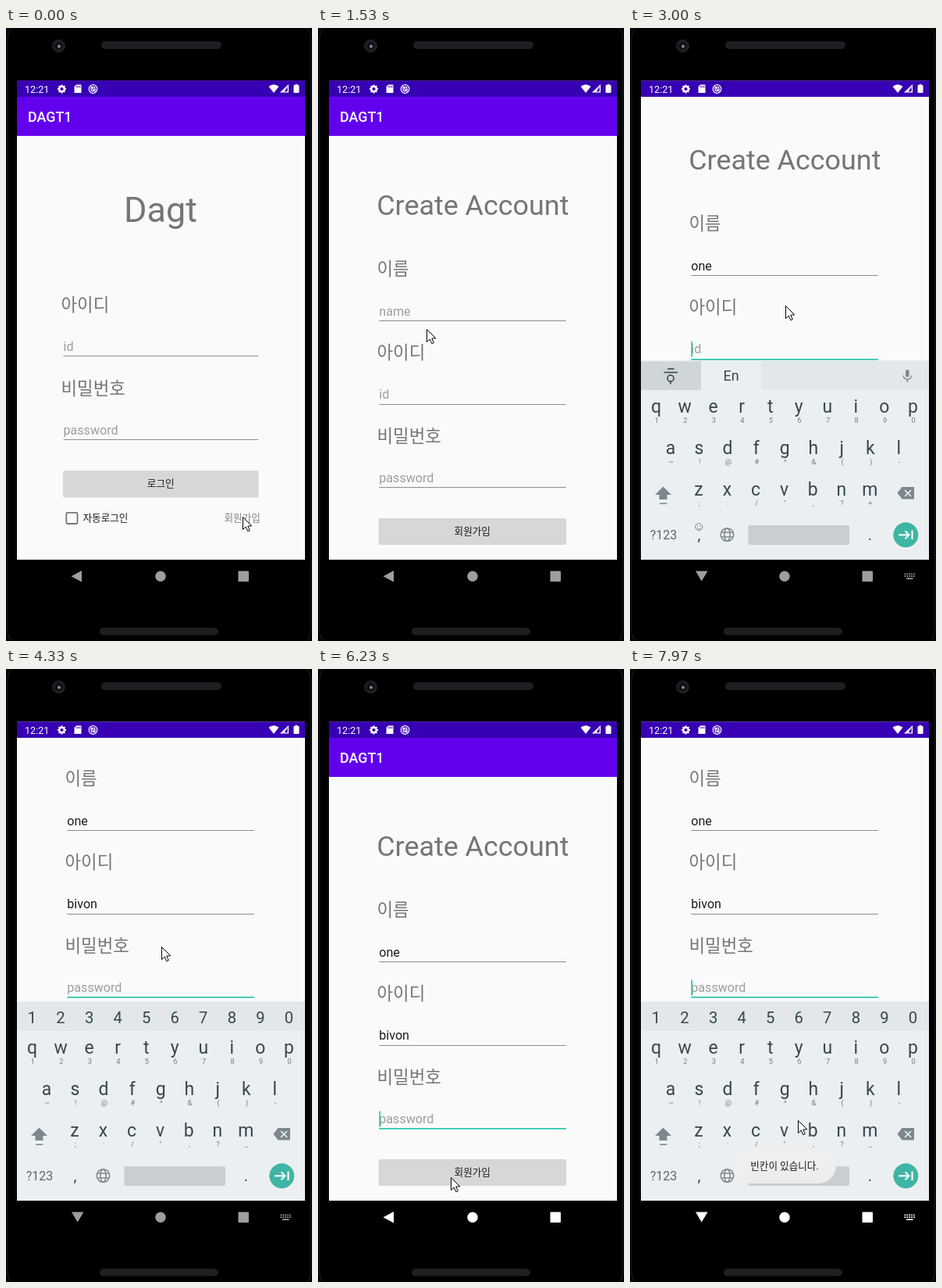
An HTML page with a canvas for the animation above (8 s loop, 392x784 px).

```html
<!DOCTYPE html>
<html lang="ko">
<head>
<meta charset="utf-8">
<title>Sign-up demo</title>
<style>
html, body { margin: 0; width: 100%; height: 100%; overflow: hidden; background: #000; }
canvas { display: block; width: 392px; height: 784px; }
</style>
</head>
<body>
<canvas id="stage"></canvas>
<script>
const W = 392, H = 784, LOOP = 8000;
const FONT = "Roboto, 'Noto Sans CJK KR', 'Noto Sans CJK', sans-serif";
const C = {
  paper: '#fafafa', bar: '#6200ee', status: '#3700b3', white: '#ffffff',
  grey: '#757575', hint: '#9d9d9d', ink: '#1c1c1c', line: '#8c8c8c',
  teal: '#2fc4b0', button: '#d6d7d7', keys: '#eceff1', strip: '#e3e7e9', tab: '#d0d5d8',
  key: '#37474f', sub: '#717d83', icon: '#7c888e', space: '#c8ced2', toast: '#f0f0f0',
  metal: '#1e1e22'
};
const SCREEN = { x: 14, y: 67.5, w: 369, h: 612.5 };

const canvas = document.getElementById('stage');
const g = canvas.getContext('2d');
const dpr = window.devicePixelRatio || 1;
canvas.width = W * dpr;
canvas.height = H * dpr;

// ---- timing helpers ----
const clamp = v => Math.max(0, Math.min(1, v));
const span = (t, a, b) => clamp((t - a) / (b - a));
const inOut = p => p < .5 ? 2 * p * p : 1 - 2 * (1 - p) * (1 - p);
const out = p => 1 - (1 - p) ** 3;
const mix = (a, b, p) => a + (b - a) * p;
const within = (t, a, b) => t >= a && t < b;

// Letters of a word that have been typed by time t.
const typed = (word, times, t) => word.slice(0, times.filter(k => t >= k).length);

const POINTER = [
  [0, 303, 625], [1050, 303, 625], [1530, 139, 385], [1800, 199, 355],
  [5000, 199, 355], [5530, 110, 673], [5960, 110, 673], [6400, 195, 640],
  [6740, 195, 640], [7020, 195, 585], [7400, 195, 585], [7900, 215, 577], [LOOP, 215, 577]
];

function pointerAt(t) {
  const i = Math.max(1, POINTER.findIndex(k => k[0] > t));
  const [a, b] = [POINTER[i - 1], POINTER[i]];
  const p = inOut(span(t, a[0], b[0]));
  return [Math.round(mix(a[1], b[1], p)), Math.round(mix(a[2], b[2], p))];
}

function panAt(t) {
  if (t < 3500) return -58 * out(span(t, 2840, 2995));
  if (t < 5700) return mix(-58, -168, out(span(t, 3840, 4080)));
  if (t < 7000) return -168 * (1 - inOut(span(t, 5805, 6055)));
  return -168 * out(span(t, 7140, 7370));
}

// Visibility of the keyboard: it fades while sliding a short way.
function keyboardShown(t) {
  if (t < 5000) return out(span(t, 2120, 2320));
  if (t < 7000) return 1 - span(t, 5837, 5987) ** 2;
  return out(span(t, 7160, 7360));
}

// ---- drawing helpers ----
function rect(x, y, w, h, color, r = 0) {
  g.fillStyle = color;
  g.beginPath();
  g.roundRect(x, y, w, h, r);
  g.fill();
}

function dot(x, y, r, color) {
  g.fillStyle = color;
  g.beginPath();
  g.arc(x, y, r, 0, 7);
  g.fill();
}

function ring(x, y, r, color, width = 1) {
  g.strokeStyle = color;
  g.lineWidth = width;
  g.beginPath();
  g.arc(x, y, r, 0, 7);
  g.stroke();
}

function trace(pts) {
  g.beginPath();
  for (let i = 0; i < pts.length; i += 2) g.lineTo(pts[i], pts[i + 1]);
}

function poly(color, ...pts) {
  trace(pts);
  g.closePath();
  g.fillStyle = color;
  g.fill();
}

function stroke(color, width, ...pts) {
  trace(pts);
  g.strokeStyle = color;
  g.lineWidth = width;
  g.stroke();
}

function text(s, x, y, size, color, align = 'left', weight = 400) {
  g.font = `${weight} ${size}px ${FONT}`;
  g.textAlign = align;
  g.fillStyle = color;
  g.fillText(s, x, y);
}

function clipTo(x, y, w, h) {
  g.beginPath();
  g.rect(x, y, w, h);
  g.clip();
}

// ---- phone ----
function drawPhone() {
  rect(0, 0, W, H, '#000');
  g.strokeStyle = '#15151a';
  g.lineWidth = 1.5;
  g.beginPath();
  g.roundRect(2, -12, 388.5, 808, 26);
  g.stroke();
  rect(122, 17, 154, 10, C.metal, 5);
  rect(120, 767, 152, 9.5, C.metal, 5);
  dot(67.5, 23, 8.5, C.metal);
  dot(67.5, 23, 5, '#0e0e14');
  dot(68, 23.5, 2, '#7f8ca0');
}

function drawStatus() {
  const white = C.white;
  rect(SCREEN.x, SCREEN.y, SCREEN.w, 20.5, C.status);
  text('12:21', 24, 82.5, 12.6, white);
  ring(71.5, 78, 3.3, white, 2.4);
  for (let i = 0; i < 8; i++) {
    const a = i * Math.PI / 4, c = Math.cos(a), s = Math.sin(a);
    stroke(white, 2, 71.5 + 3.5 * c, 78 + 3.5 * s, 71.5 + 5.5 * c, 78 + 5.5 * s);
  }
  poly(white, 87.5, 75, 90, 72.5, 96.5, 72.5, 96.5, 83, 87.5, 83);
  for (const x of [90.3, 92.3, 94.3]) rect(x, 74, 1, 2.2, C.status);
  ring(111.5, 78, 5.3, white, 1.2);
  ring(111.5, 78, 2.6, white, 1.2);
  stroke(white, 1.3, 108.5, 75, 114.5, 81);
  g.beginPath();
  g.moveTo(343, 83);
  g.lineTo(336.5, 74.8);
  g.quadraticCurveTo(343, 69.8, 349.5, 74.8);
  g.closePath();
  g.fillStyle = white;
  g.fill();
  poly(white, 351, 82.5, 362, 82.5, 362, 72);
  poly(C.status, 356.5, 81.3, 360.7, 81.3, 360.7, 75);
  rect(368.5, 73, 7, 10, white, 1);
  rect(370.5, 71.8, 3, 2, white);
}

function drawNav(t) {
  const tone = Math.round(mix(158, 255, span(t, 5780, 5920)));
  const color = `rgb(${tone},${tone},${tone})`;
  const glow = span(t, 5720, 5800) * (1 - span(t, 5960, 6200));
  if (glow) {
    g.globalAlpha = glow;
    rect(46, 681.5, 90.5, 41, 'rgba(255,255,255,.17)', 20.5);
    g.globalAlpha = 1;
  }
  if (within(t, 2120, 5920) || t >= 7165) poly(color, 84, 694.5, 99.5, 694.5, 91.7, 707.5);
  else poly(color, 97, 694, 97, 708.5, 83.5, 701.2);
  dot(198, 701.3, 6.7, color);
  rect(297.5, 694.5, 13.5, 13.5, color, 1);
  if (within(t, 2090, 5840) || t >= 7100) {
    for (let r = 0; r < 2; r++)
      for (let i = 0; i < 5; i++) rect(351.5 + i * 2.9, 697.5 + r * 2.8, 1.7, 1.7, color);
    rect(354, 703.3, 8.5, 1.7, color);
  }
}

// ---- app pages ----
function pageBase() {
  rect(SCREEN.x, SCREEN.y, SCREEN.w, SCREEN.h, C.paper);
  rect(SCREEN.x, 38, SCREEN.w, 100, C.bar);
  text('DAGT1', 28, 120.3, 17.9, C.white, 'left', 500);
}

function field(x, w, base, hint, value = '', focus = false, caret = false) {
  text(value || hint, x, base, 16.1, value ? C.ink : C.hint);
  rect(x, Math.round(base + 6.4), w, focus ? 1.8 : 1, focus ? C.teal : C.line);
  if (caret) {
    g.font = `400 16.1px ${FONT}`;
    rect(x + (value ? g.measureText(value).width : 0), base - 15.5, 1.7, 20, C.teal);
  }
}

function button(x, y, w, h, label) {
  rect(x, y, w, h, C.button, 2);
  text(label, x + w / 2, y + h / 2 + 4, 12.6, C.ink, 'center');
}

function drawLogin() {
  pageBase();
  text('Dagt', 198, 248, 44.9, C.grey, 'center');
  text('아이디', 70.5, 362, 22.4, C.grey);
  field(73.5, 249.5, 413, 'id');
  text('비밀번호', 70.5, 468.8, 22.4, C.grey);
  field(73.5, 249.5, 519.5, 'password');
  button(73, 566, 250.5, 34.5, '로그인');
  g.strokeStyle = C.grey;
  g.lineWidth = 1.8;
  g.beginPath();
  g.roundRect(77.3, 619.8, 14.2, 14.2, 1.5);
  g.stroke();
  text('자동로그인', 98.5, 631.4, 12.6, C.ink);
  text('회원가입', 279.5, 630.6, 12.6, '#858585');
}

function drawSignup(t) {
  const focus = t < 1970 ? -1 : t < 2840 ? 0 : t < 3830 ? 1 : 2;
  const blink = focus < 2 || Math.floor((t - 3830) / 500) % 2 === 0;
  const rows = [
    ['이름', 'name', typed('one', [2500, 2570, 2630], t)],
    ['아이디', 'id', typed('bivon', [3110, 3190, 3270, 3430, 3600], t)],
    ['비밀번호', 'password', '']
  ];
  g.save();
  g.translate(0, Math.round(panAt(t)));
  rect(SCREEN.x, 0, SCREEN.w, 900, C.paper);
  pageBase();
  text('Create Account', 198.3, 239, 35.9, C.grey, 'center');
  rows.forEach(([label, hint, value], i) => {
    const y = i * 106.7;
    text(label, 75.5, 316.3 + y, 22.4, C.grey);
    field(78.3, 239.5, 367.6 + y, hint, value, focus === i, focus === i && blink);
  });
  button(77.5, 627, 240.5, 34, '회원가입');
  g.restore();
}

// ---- keyboard ----
const ROWS = [
  ['qwertyuiop', '1234567890', 33.5, 491.5],
  ['asdfghjkl', '~!@#^&()-', 52, 544.5],
  ['zxcvbnm', ';:/",?', 88, 597.5]
];
const PITCH = 36.55;

function drawStrip(numeric) {
  rect(14, 425.5, 369, 37.5, C.strip);
  if (numeric) {
    [...'1234567890'].forEach((n, i) => text(n, 33.5 + i * PITCH, 453.2, 20.3, C.key, 'center'));
    return;
  }
  rect(14, 426.5, 77, 36.5, C.tab);
  rect(91, 425.5, 77, 37.5, C.keys);
  stroke(C.key, 1.6, 48, 436, 56.5, 436);
  stroke(C.key, 1.6, 43.5, 440.5, 61, 440.5);
  ring(52, 448, 4, C.key, 1.6);
  stroke(C.key, 1.6, 52, 452, 52, 455.5);
  text('En', 129.5, 451, 18, C.key, 'center');
  rect(353, 437, 4.6, 9.5, C.icon, 2.3);
  g.strokeStyle = C.icon;
  g.lineWidth = 1.4;
  g.beginPath();
  g.arc(355.3, 444.5, 5, 0, Math.PI);
  g.stroke();
  stroke(C.icon, 1.5, 355.3, 449.5, 355.3, 453);
}

function drawGlobe(x, y) {
  ring(x, y, 8.3, C.icon, 1.5);
  g.beginPath();
  g.ellipse(x, y, 3.6, 8.3, 0, 0, 7);
  g.stroke();
  stroke(C.icon, 1.4, x - 7.6, y - 2.9, x + 7.6, y - 2.9);
  stroke(C.icon, 1.4, x - 7.6, y + 2.9, x + 7.6, y + 2.9);
}

function drawKeyboard(t) {
  const shown = keyboardShown(t);
  if (!shown) return;
  const numeric = t >= 3870;
  g.save();
  g.globalAlpha = shown;
  g.translate(0, 30 * (1 - shown));
  rect(14, 425.5, 369, 254.5, C.keys);
  drawStrip(numeric);
  for (const [letters, subs, x0, y] of ROWS) {
    const marks = subs.length < letters.length ? subs + (numeric ? '_' : '+') : subs;
    [...letters].forEach((ch, i) => {
      const x = x0 + i * PITCH;
      text(ch, x, y, 23, C.key, 'center');
      text(marks[i], x + .7, y + 13, 9.3, C.sub, 'center');
    });
  }
  poly(C.icon, 42.5, 586.5, 53, 597, 47.5, 597, 47.5, 603, 37.5, 603, 37.5, 597, 32, 597);
  rect(38, 607.5, 9.5, 1.5, C.icon);
  poly(C.icon, 342.5, 594.8, 348.5, 587, 364, 587, 364, 602.5, 348.5, 602.5);
  stroke(C.keys, 1.7, 352, 591, 360, 599);
  stroke(C.keys, 1.7, 360, 591, 352, 599);

  text('?123', 43, 653.7, 16, '#5b686f', 'center');
  text(',', 88.5, 655, 20, C.key, 'center');
  if (!numeric) {
    ring(88.3, 638, 4.6, C.icon, 1);
    dot(86.7, 636.8, .7, C.icon);
    dot(89.9, 636.8, .7, C.icon);
    g.beginPath();
    g.arc(88.3, 638.5, 2.4, .3, 2.84);
    g.stroke();
  }
  drawGlobe(124.5, 648);
  rect(151.5, 636, 129.5, 25, C.space, 2);
  text('.', 307.5, 655, 20, C.key, 'center');
  dot(353.3, 648.3, 16, '#3fb5a5');
  stroke(C.white, 2, 344, 648.3, 357, 648.3);
  stroke(C.white, 2, 352.5, 643.3, 357.5, 648.3, 352.5, 653.3);
  stroke(C.white, 2, 361.5, 642.5, 361.5, 654);
  g.restore();
}

function drawToast(t) {
  const a = span(t, 6620, 6800);
  if (!a) return;
  g.globalAlpha = a * .94;
  rect(132.5, 613, 131.5, 45, C.toast, 22.5);
  g.globalAlpha = a;
  text('빈칸이 있습니다.', 198, 640.3, 12.6, C.ink, 'center');
  g.globalAlpha = 1;
}

function drawPointer(t) {
  const [x, y] = pointerAt(t);
  g.save();
  g.translate(x + .5, y + .5);
  trace([0, 0, 0, 16, 3.7, 12.5, 6.3, 18.2, 8.8, 17.1, 6.3, 11.6, 11.3, 11.3]);
  g.closePath();
  g.fillStyle = '#fff';
  g.fill();
  g.strokeStyle = '#000';
  g.lineWidth = 1;
  g.stroke();
  g.restore();
}

// The sign-up page fades in while growing to full size.
function drawPages(t) {
  const enter = span(t, 830, 1230);
  g.save();
  clipTo(SCREEN.x, SCREEN.y, SCREEN.w, SCREEN.h);
  if (enter < 1) drawLogin();
  if (enter > 0) {
    const scale = mix(.85, 1, out(enter));
    g.globalAlpha = span(t, 830, 950);
    g.translate(198.5, 374);
    g.scale(scale, scale);
    g.translate(-198.5, -374);
    clipTo(SCREEN.x, SCREEN.y, SCREEN.w, SCREEN.h);
    drawSignup(t);
  }
  g.restore();
}

function draw(t) {
  g.setTransform(dpr, 0, 0, dpr, 0, 0);
  drawPhone();
  drawPages(t);
  drawKeyboard(t);
  drawToast(t);
  drawStatus();
  drawNav(t);
  drawPointer(t);
}

const start = performance.now();
function tick() {
  draw((performance.now() - start) % LOOP);
  requestAnimationFrame(tick);
}
tick();
</script>
</body>
</html>
```
